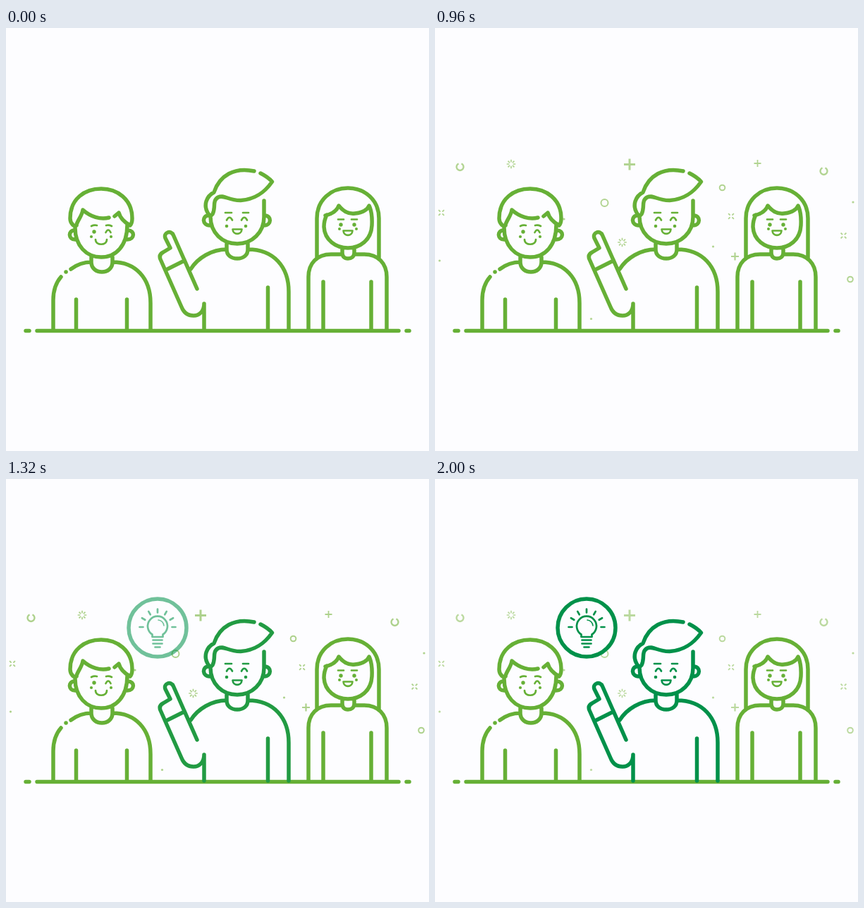
An HTML page for the animation above (2040 ms loop, 600 by 600 pixels).

```html
<!DOCTYPE html>
<html lang="en">
<head>
<meta charset="utf-8">
<title>Team idea</title>
<style>
html, body { margin: 0; width: 100%; height: 100%; overflow: hidden; background: #fdfdff; }
svg { display: block; width: 100vw; height: 100vh; }
.line { fill: none; stroke: currentColor; stroke-width: 5.5; stroke-linecap: round; stroke-linejoin: round; }
.thin { stroke-width: 2.7; }
.dots { fill: currentColor; stroke: none; }
</style>
</head>
<body>
<svg viewBox="0 0 600 600">
  <g id="sparkles" class="line" color="#79b540"></g>

  <g class="line" color="#66b036">
    <path d="M28 429.5H33 M44 429.5H557 M568 429.5H572"/>

    <path d="M100 280C97 283 91 277 91 270C91 242 112 228 135 228S179 243 179 270C179 275 178 278 176 280C169 276 162 270 160 262L154 267
      M100 279C102 272 108 266 109 258C120 268 134 272 146 269
      M98 283C98 309 114 325 135 325S172 309 172 279
      M97 287C88 287 88 300 98 300 M173 287C183 287 183 300 172 300
      M121 325V332C121 341 128 346 136 346S151 341 151 332V325
      M67 428V386C67 372 71 361 78 353 M85 346H85.1 M92 342C100 336 111 332 121 332
      M151 332C184 332 205 355 205 390V428 M99.500 385V428 M171.500 385V428"/>
    <path class="thin" d="M121 281Q125 279 129 280 M142 280Q146 279 150 281 M141.500 290Q145 283 148.500 290 M127 300C127 309 143 309 143 300"/>
    <g class="dots"><circle cx="125" cy="289" r="2.700"/><circle cx="121" cy="296" r="2.100"/><circle cx="149" cy="296" r="2.100"/></g>

    <path d="M441 327V270C441 244 461 227 485 227S529 244 529 270V327
      M453 266C462 264 469 260 472 252C479 261 487 264 495 263C504 262 512 259 515 252C519 260 519.500 270 519 280C518 301 502 312 485 312S452 301 451 282C451 276 452 271 455 265
      M477 314V319C477 324 480 327 485 327S494 324 494 319V314
      M429 428V353C429 334 441 321 461 321H477 M494 321H508C528 321 540 334 540 353V428
      M450 360V428 M518 360V428"/>
    <path class="thin" d="M471 271.500H479 M490 271.500H498 M478.500 287.500H491.500C491 296 479 296 478.500 287.500Z"/>
    <g class="dots"><circle cx="475" cy="279" r="2.700"/><circle cx="494" cy="279" r="2.700"/><circle cx="473" cy="285" r="2"/><circle cx="497" cy="285" r="2"/></g>
  </g>

  <g id="speaker" class="line">
    <path d="M352 203C324 197 303 209 295 233C284 239 280 251 286 262C288 266 291 267 293 264C298 255 292 245 301 240C309 236 316 245 333 244.500C354 243 367 233 377.500 218C373 213 367 209 361 206
      M290 267C290 291 307 306 328 306S366 290 366 268V245
      M287 266C278 266 278 280 289 280 M367 266C377 266 377 280 366 280
      M313 306V314C313 322 319 327 328 327S343 322 343 314V306
      M262 342C272 326 292 314 313 314 M343 314C380 314 401 339 401 374V428 M371.500 368V428
      M281 428V391C281 402 274 408 266 408C258 408 253 404 250 398L219 328C217 323 219 320 223 318L233 312L226 298C223 290 234 286 237.500 294L271 370
      M229 342L251 331"/>
    <path class="thin" d="M311 262H320 M336 262H344 M313 272.500Q317 265 321 272.500 M334 272.500Q338 265 342 272.500 M321.500 285.500H334.500C334 294 322 294 321.500 285.500Z"/>
    <g class="dots"><circle cx="313" cy="281" r="2.300"/><circle cx="340" cy="281" r="2.300"/></g>
  </g>

  <g id="idea" class="line" color="#00914a">
    <circle cx="215" cy="211" r="41"/>
    <path class="thin" d="M207.500 224V220.500A14 14 0 1 1 222.500 220.500V224Z M208.500 228.500H221.500 M208.500 233.500H221.500 M211.500 238.500H218.500"/>
    <path class="thin" style="stroke-width:1.600" d="M216 200Q223 201 224 208"/>
    <path id="rays" class="thin"/>
  </g>
</svg>
<script>
const LOOP = 2040;
const PALE = [102, 176, 54], DEEP = [0, 145, 74];
const byId = id => document.getElementById(id);
const clamp = x => Math.max(0, Math.min(1, x));
const ramp = (t, from, to) => clamp((t - from) / (to - from));
const smooth = p => p * p * (3 - 2 * p);
const mix = (a, b, p) => a + (b - a) * p;

// Short strokes pointing outwards from (x, y).
function spokes(x, y, inner, outer, count, start, step) {
  let d = "";
  for (let i = 0; i < count; i++) {
    const a = (start + i * step) * Math.PI / 180, c = Math.cos(a), s = Math.sin(a);
    d += `M${x + inner * c} ${y + inner * s}L${x + outer * c} ${y + outer * s}`;
  }
  return d;
}

const stroke = (d, w) => `<path d="${d}" stroke-width="${w}" stroke-linecap="butt"/>`;
const ring = (x, y, r) => `<circle cx="${x}" cy="${y}" r="${r}" stroke-width="2"/>`;
const openRing = (x, y) => stroke(`M${x - 2} ${y - 4.6}A5 5 0 1 0 ${x + 2} ${y - 4.6}`, 2.4);
const burst = (x, y) => stroke(spokes(x, y, 2.7, 6.3, 8, 0, 45), 1.7);
const cross = (x, y) => stroke(spokes(x, y, 2, 5.5, 4, 45, 90), 1.9);
const plus = (x, y, r, w) => stroke(`M${x - r} ${y}h${2 * r}M${x} ${y - r}v${2 * r}`, w);
const dot = (x, y) => `<circle class="dots" cx="${x}" cy="${y}" r="1.6"/>`;

byId("sparkles").innerHTML = [
  openRing(35.5, 197), openRing(551.5, 203),
  ring(240.5, 248, 5), ring(407.5, 226.5, 3.8), ring(589, 356.5, 3.8),
  burst(108, 193), burst(265.5, 304),
  cross(9, 262), cross(420, 267), cross(579.5, 294.5),
  plus(276, 193.5, 8, 3), plus(457.5, 192, 5, 1.8), plus(425.5, 324, 5.5, 2.2),
  dot(6.5, 330), dot(593, 247), dot(183, 271), dot(394.5, 310), dot(221.5, 412.5)
].join("");
byId("rays").setAttribute("d", spokes(215, 210, 20.5, 25.5, 7, 180, 30));

function sparkleOpacity(t) {
  if (t < 1130) return 0.72 * Math.pow(t / 1130, 1.5);
  return 0.48 + 0.24 * Math.cos((t - 1130) / 570 * Math.PI);
}

function render(t) {
  byId("sparkles").setAttribute("opacity", sparkleOpacity(t));
  byId("idea").setAttribute("opacity", ramp(t, 1110, 1490));
  const p = smooth(ramp(t, 1100, 1460));
  byId("speaker").setAttribute("color", `rgb(${PALE.map((c, i) => Math.round(mix(c, DEEP[i], p)))})`);
}

const begin = performance.now();
function tick() {
  const t = (performance.now() - begin) % LOOP;
  render(Math.floor(t / 40) * 40);
  requestAnimationFrame(tick);
}
render(0);
requestAnimationFrame(tick);
</script>
</body>
</html>
```
